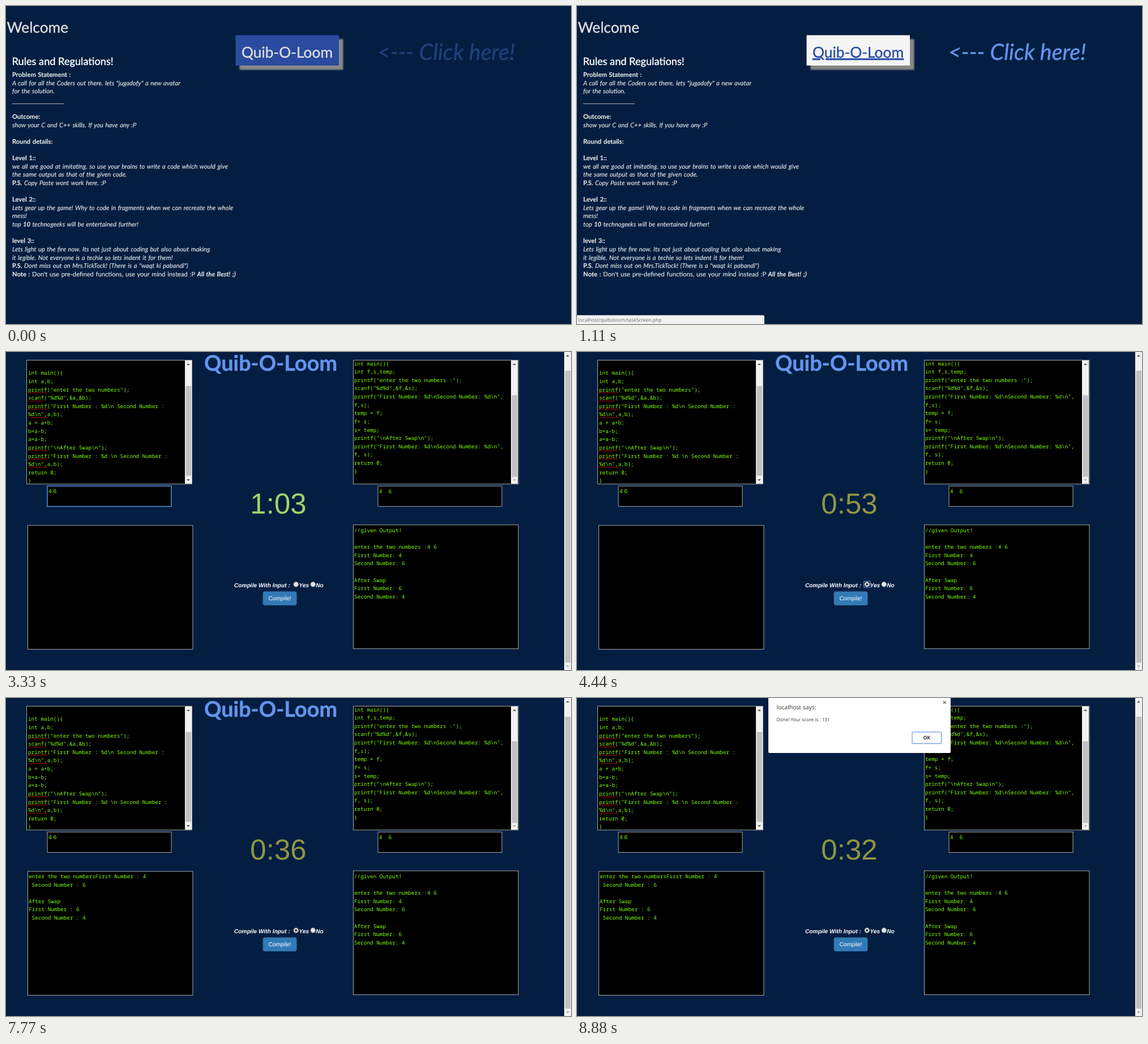
Recreate the animation shown at these times as an HTML page. Size 998x561 px, loop 9.99 s.

```html
<!DOCTYPE html>
<html lang="en">
<head>
<meta charset="utf-8">
<title>Coding contest</title>
<style>
html, body { margin: 0; width: 100%; height: 100%; overflow: hidden; background: #031e41; }
svg { display: block; width: 998px; height: 561px; }
text { white-space: pre; text-rendering: geometricPrecision; }
.hand { font-family: Lato, "Open Sans", sans-serif; color: #dedede; fill: currentColor; stroke: currentColor; stroke-width: .4px; }
.rules { font-size: 11.2px; word-spacing: .9px; stroke-width: .2px; }
.b { font-weight: 700; }
.i { font-style: italic; }
.code { font: 9.36px "Noto Sans Mono", "DejaVu Sans Mono", monospace; fill: #7cff00; }
.ui { font-family: "Liberation Sans", Arial, sans-serif; fill: #fff; font-size: 10.2px; }
.sys { font-family: "Open Sans", "Noto Sans", sans-serif; fill: #333; }
</style>
</head>
<body>
<svg id="stage" viewBox="0 0 998 561"></svg>
<script>
const STEP = 1110, COUNT = 9, LINE = 14.62, SCROLL = 22.6;
const NAME = 'Quib-O-Loom';
const stage = document.getElementById('stage');

const esc = s => s.replace(/&/g, '&amp;').replace(/</g, '&lt;');
const text = (x, y, s, cls, attrs = '') => `<text x="${x}" y="${y}" class="${cls}" ${attrs}>${esc(s)}</text>`;
const rect = (x, y, w, h, fill, attrs = '') => `<rect x="${x}" y="${y}" width="${w}" height="${h}" fill="${fill}" ${attrs}/>`;
const lines = (x, y, list) => list.map((s, k) => text(x, y + k * LINE, s, 'code')).join('');
const box = (x, y, w, h, stroke = '#a9a9a9', sw = 1) =>
  rect(x, y, w, h, '#000', `stroke="${stroke}" stroke-width="${sw}"`);

// Rows of the rules: [row, [style, text], ...]
const INTRO = [
  [0, ['b', 'Problem Statement :']],
  [1, ['i', 'A call for all the Coders out there. lets "jugadofy" a new avatar']],
  [2, ['i', 'for the solution.']]
];
const ROUNDS = [
  [0, ['b', 'Outcome:']],
  [1, ['i', 'show your C and C++ skills. If you have any :P']],
  [3, ['b', 'Round details:']],
  [5, ['b', 'Level 1::']],
  [6, ['i', 'we all are good at imitating. so use your brains to write a code which would give']],
  [7, ['i', 'the same output as that of the given code.']],
  [8, ['b', 'P.S. '], ['i', 'Copy Paste wont work here. :P']],
  [10, ['b', 'Level 2::']],
  [11, ['i', 'Lets gear up the game! Why to code in fragments when we can recreate the whole']],
  [12, ['i', 'mess!']],
  [13, ['i', 'top '], ['b i', '10'], ['i', ' technogeeks will be entertained further!']],
  [15, ['b', 'level 3::']],
  [16, ['i', 'Lets light up the fire now. Its not just about coding but also about making']],
  [17, ['i', 'it legible. Not everyone is a techie so lets indent it for them!']],
  [18, ['b', 'P.S. '], ['i', 'Dont miss out on Mrs.TickTock! (There is a "waqt ki pabandi")']],
  [19, ['b', 'Note : '], ['', "Don't use pre-defined functions, use your mind instead :P "], ['b i', 'All the Best! ;)']]
];

const GIVEN = [
  '//Given piece of Code.!', '', '', '#include <stdio.h>', '',
  'int main(){', 'int f,s,temp;', 'printf("enter the two numbers :");',
  'scanf("%d%d",&f,&s);', 'printf("First Number: %d\\nSecond Number: %d\\n",', 'f,s);',
  'temp = f;', 'f= s;', 's= temp;', 'printf("\\nAfter Swap\\n");',
  'printf("First Number: %d\\nSecond Number: %d\\n",', 'f, s);', 'return 0;', '}'
];
const ANSWER = [
  'int main(){', 'int a,b;', 'printf("enter the two numbers");', 'scanf("%d%d",&a,&b);',
  'printf("First Number : %d\\n Second Number :', '%d\\n",a,b);', 'a = a+b;', 'b=a-b;', 'a=a-b;',
  'printf("\\nAfter Swap\\n");', 'printf("First Number : %d \\n Second Number :', '%d\\n",a,b);',
  'return 0;', '}'
];
const GIVEN_OUT = [
  '//given Output!', '', 'enter the two numbers :4 6', 'First Number: 4', 'Second Number: 6',
  '', 'After Swap', 'First Number: 6', 'Second Number: 4'
];
const OWN_OUT = [
  'enter the two numbersFirst Number : 4', ' Second Number : 6', '',
  'After Swap', 'First Number : 6', ' Second Number : 4'
];

// Editor states, one per step from the third on
const GREEN = '#a0d468', OLIVE = '#8f9443', DIM = '#344341';
const STATES = [
  { time: '4:52', color: GREEN },
  { time: '1:03', color: GREEN, typed: true, focus: 'input' },
  { time: '0:53', color: OLIVE, typed: true, yes: true, focus: 'radio' },
  { time: '0:44', color: DIM, typed: true, yes: true, focus: 'radio', dark: true },
  { time: '0:40', color: OLIVE, typed: true, yes: true, dark: true, done: true },
  { time: '0:36', color: OLIVE, typed: true, yes: true, done: true },
  { time: '0:32', color: OLIVE, typed: true, yes: true, done: true, alert: true }
];

const rules = (rows, y) => rows.map(([row, ...parts]) =>
  `<text x="11" y="${y + row * LINE}" class="hand rules">` +
  parts.map(([cls, s]) => `<tspan class="${cls}">${esc(s)}</tspan>`).join('') + '</text>').join('');

function welcome(hover) {
  const ink = hover ? '#2a4b9f' : '#dedede';
  return text(1.5, 46.5, 'Welcome', 'hand', 'font-size="26.3"') +
    rect(412.5, 58.5, 183, 54, '#888', 'filter="url(#soft)"') +
    rect(405.5, 51.5, 182.5, 53.5, hover ? '#f5f5f5' : '#2a4b9f') +
    text(496.5, 90.5, NAME, 'hand', `font-size="26.3" text-anchor="middle" style="color:${ink}"` +
      (hover ? ' text-decoration="underline"' : '')) +
    text(656, 95, '<--- Click here!', 'hand i', `font-size="39.4" style="color:${hover ? '#6495ed' : '#20407a'}"`) +
    text(10.5, 104, 'Rules and Regulations!', 'hand', 'font-size="18.2" style="color:#fff"') +
    rules(INTRO, 125) + rect(11, 172.2, 91, .8, '#dedede') + rules(ROUNDS, 199) +
    (hover ? '<path d="M0 545.5H328Q331 545.5 331 548.5V561H0Z" fill="#f2f2f2"/>' +
      text(2, 556.5, 'localhost/quiboloom/taskScreen.php', 'sys', 'font-size="8.6" style="fill:#666"') : '');
}

// Vertical scrollbar; atTop / atEnd fade the matching arrow
function scrollbar(x, y, h, from, to, atTop, atEnd) {
  const arrow = (cy, dir, off) =>
    `<path d="M${x + 3} ${cy + dir * 1.5}h6l-3 ${-3 * dir}z" fill="${off ? '#a8a8a8' : '#505050'}"/>`;
  return rect(x, y, 12, h, '#f1f1f1') + rect(x + 1.5, from, 9.5, to - from, '#c1c1c1') +
    arrow(y + 6.5, 1, atTop) + arrow(y + h - 6.5, -1, atEnd);
}

function squiggle(x, y, chars) {
  let d = `M${x} ${y}`;
  for (let k = 0; k < chars * 2.8; k++) d += `l2 ${k % 2 ? 1.4 : -1.4}`;
  return `<path d="${d}" fill="none" stroke="#e01010" stroke-width=".8"/>`;
}

function answer() {
  const y = 63;
  return lines(39, y, ANSWER) + ANSWER.map((s, k) => {
    const n = /^(printf|%d)/.test(s) ? 6 : /^scanf/.test(s) ? 5 : 0;
    return n ? squiggle(39, y + k * LINE + 2.8, n) : '';
  }).join('');
}

const radio = (x, on, focus) =>
  (focus ? rect(x - 5.5, 427, 11, 11, 'none', 'stroke="#5b8fdc"') : '') +
  `<circle cx="${x}" cy="432.5" r="4.3" fill="#e4e4e4" stroke="#8c8c8c" stroke-width=".8"/>` +
  (on ? `<circle cx="${x}" cy="432.5" r="2.2" fill="#444"/>` : '');

function editor(s) {
  const input = s.focus === 'input';
  return box(36.5, 37, 292, 218.5) +
    `<g clip-path="url(#left)">${s.typed ? answer() : text(39, 49, '// Enter your logic Here Folks!', 'code')}</g>` +
    (s.typed ? scrollbar(316, 37.5, 217.5, 82.6, 241) : '') +
    box(73, 259, 219, 36, input ? '#5b8fdc' : '#a9a9a9', input ? 1.5 : 1) +
    (s.typed ? text(75, 271.5, '4 6', 'ui', 'style="fill:#7cff00"') : '') +
    box(38.5, 328.5, 291.5, 218.5) + (s.done ? lines(40, 340.6, OWN_OUT) : '') +
    box(613.5, 37, 291.5, 218.5) +
    `<g clip-path="url(#right)">${lines(615, s.typed ? -26.9 : 49, GIVEN)}</g>` +
    (s.typed ? scrollbar(892, 37.5, 217.5, 99, 243, false, true)
             : scrollbar(892, 37.5, 217.5, 50, 193, true)) +
    box(657, 259, 219, 36) + text(659, 271.5, '4  6', 'code') +
    box(613.5, 327.5, 291.5, 218.5) + lines(615, 340.4, GIVEN_OUT) +
    text(467.5, 55.5, NAME, 'hand b', 'font-size="37.8" text-anchor="middle" style="color:#6495ed"') +
    text(481, 308, s.time, 'ui', `text-anchor="middle" style="font-size:51px;fill:${s.color}"`) +
    text(403, 437.5, 'Compile With Input :', 'ui b i') +
    radio(512.3, s.yes, s.focus === 'radio') + text(517.5, 437.5, 'Yes', 'ui b i') +
    radio(542.3, false) + text(547.2, 437.5, 'No', 'ui b i') +
    rect(454, 445.3, 59.2, 24, s.dark ? '#286090' : '#337ab7',
      `rx="3" stroke="${s.dark ? '#204d74' : '#2e6da4'}" stroke-width=".8"`) +
    text(483.6, 461, 'Compile!', 'ui', 'text-anchor="middle"');
}

const dialog = () =>
  rect(338, -4, 322, 101, '#000', 'opacity=".45" filter="url(#soft)"') +
  rect(338, -4, 322, 101, '#fff', 'rx="2"') +
  text(352.5, 20, 'localhost says:', 'sys', 'font-size="10.4"') +
  text(352.5, 41, 'Done! Your score is : 131', 'sys', 'font-size="8.26"') +
  '<path d="M646.8 5.3l5 5m0-5l-5 5" stroke="#555" stroke-width="1.2"/>' +
  rect(592, 60, 51.5, 20.5, '#fbfbfb', 'rx="1" stroke="#4285e8"') +
  text(617.7, 73.3, 'OK', 'sys', 'font-size="8.6" font-weight="700" text-anchor="middle"');

const DEFS = '<defs><filter id="soft" x="-10%" y="-20%" width="120%" height="140%">' +
  '<feGaussianBlur stdDeviation="1.3"/></filter>' +
  `<clipPath id="left">${rect(37, 37.5, 291, 217.5, '#000')}</clipPath>` +
  `<clipPath id="right">${rect(614, 37.5, 290, 217.5, '#000')}</clipPath></defs>`;

function scene(step) {
  const back = DEFS + rect(0, 0, 998, 561, '#031e41');
  if (step < 2) return back + welcome(step === 1);
  const s = STATES[step - 2], down = s.typed;
  return back + `<g transform="translate(0 ${down ? -SCROLL : 0})">${editor(s)}</g>` +
    scrollbar(986, 0, 561, down ? 33 : 12, down ? 548 : 528, !down, down) +
    (s.alert ? dialog() : '');
}

const start = performance.now();
let shown = -1;
function draw(now) {
  const step = Math.floor(Math.max(0, now - start) / STEP) % COUNT;
  if (step !== shown) stage.innerHTML = scene(shown = step);
  requestAnimationFrame(draw);
}
draw(start);
</script>
</body>
</html>
```
